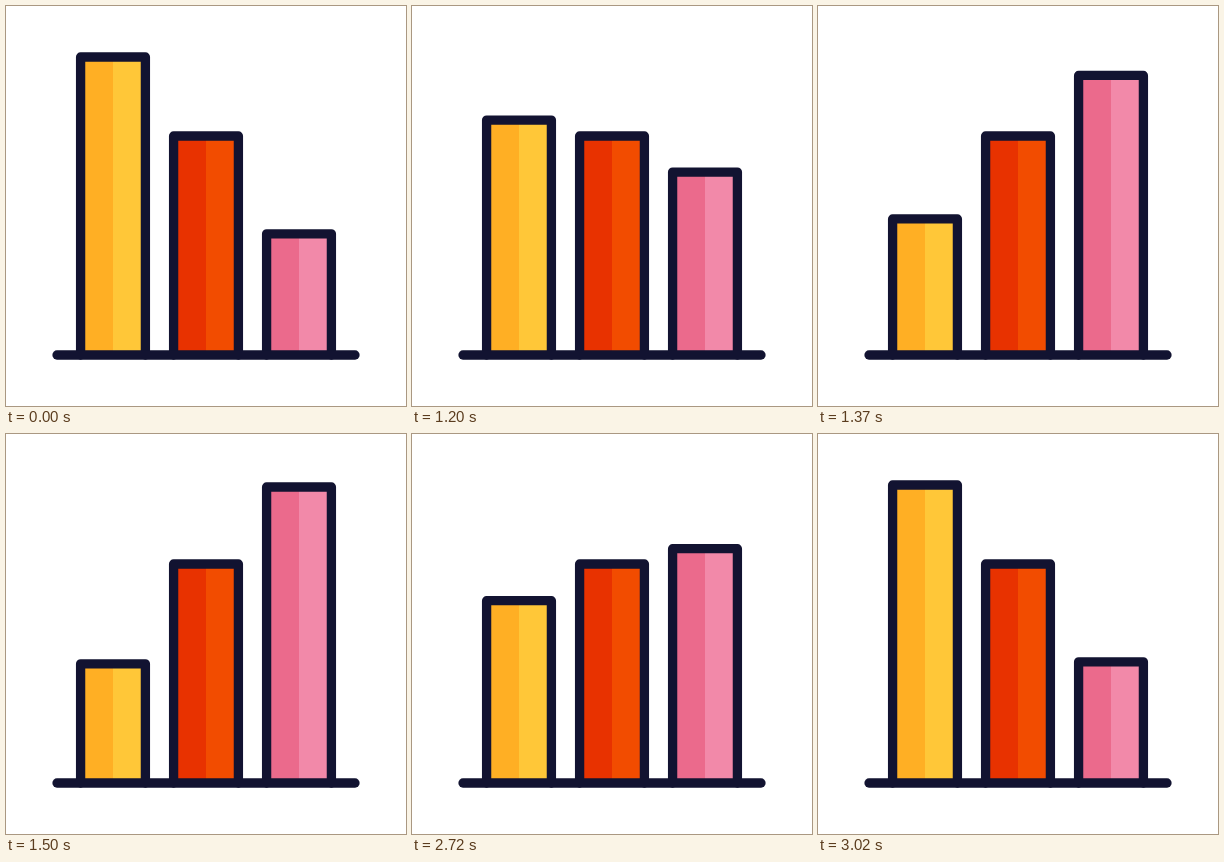
Recreate the animation shown at these times as an HTML page. Size 400 px wide and 400 px high, loop 3050 ms.

```html
<!DOCTYPE html>
<html lang="en">
<head>
<meta charset="utf-8">
<title>Bar chart</title>
<style>
  html, body { margin: 0; width: 100%; height: 100%; overflow: hidden; background: #fff; }
  svg { display: block; width: 100%; height: 100%; }
</style>
</head>
<body>
<svg viewBox="0 0 400 400" stroke-width="9.3" stroke-linecap="round" stroke-linejoin="round">
  <g id="bars"></g>
  <path d="M51 349H349" stroke="#121331"/>
</svg>
<script>
const LOOP = 3050, STEP = 25, MOVE_STEPS = 20;
const BASE = 349, HALF = 32.4;

// Bar tops slide between "from" and "to"
const bars = [
  { x: 107, from: 51, to: 229.8, dark: '#ffaf24', light: '#ffc738' },
  { x: 200, from: 130, to: 130, dark: '#e83200', light: '#f24c00' },
  { x: 293, from: 227.8, to: 53, dark: '#eb6a8c', light: '#f289a9' }
];

const group = document.getElementById('bars');
function addPath(fill, stroke) {
  const path = document.createElementNS('http://www.w3.org/2000/svg', 'path');
  path.setAttribute('fill', fill);
  path.setAttribute('stroke', stroke);
  return group.appendChild(path);
}
for (const bar of bars) {
  bar.left = addPath(bar.dark, 'none');
  bar.right = addPath(bar.light, 'none');
  bar.outline = addPath('none', '#121331');
}

const bezier = (a, b, s) => 3 * a * s * (1 - s) ** 2 + 3 * b * s * s * (1 - s) + s ** 3;

// cubic-bezier(.46, 0, .475, 1), solved by bisection
function ease(u) {
  if (u <= 0) return 0;
  if (u >= 1) return 1;
  let low = 0, high = 1;
  for (let i = 0; i < 24; i++) {
    const mid = (low + high) / 2;
    if (bezier(.46, .475, mid) < u) low = mid; else high = mid;
  }
  return bezier(0, 1, low);
}

function draw(time) {
  const step = Math.floor((time % LOOP + 5) / STEP);
  const swap = ease((step - 40) / MOVE_STEPS) - ease((step - 101) / MOVE_STEPS);
  for (const { x, from, to, left, right, outline } of bars) {
    const top = from + (to - from) * swap;
    left.setAttribute('d', `M${x - HALF} ${BASE}V${top}H${x}V${BASE}Z`);
    right.setAttribute('d', `M${x} ${BASE}V${top}H${x + HALF}V${BASE}Z`);
    outline.setAttribute('d', `M${x - HALF} ${BASE}V${top}H${x + HALF}V${BASE}`);
  }
}

function tick() {
  draw(performance.now());
  requestAnimationFrame(tick);
}
tick();
</script>
</body>
</html>
```
